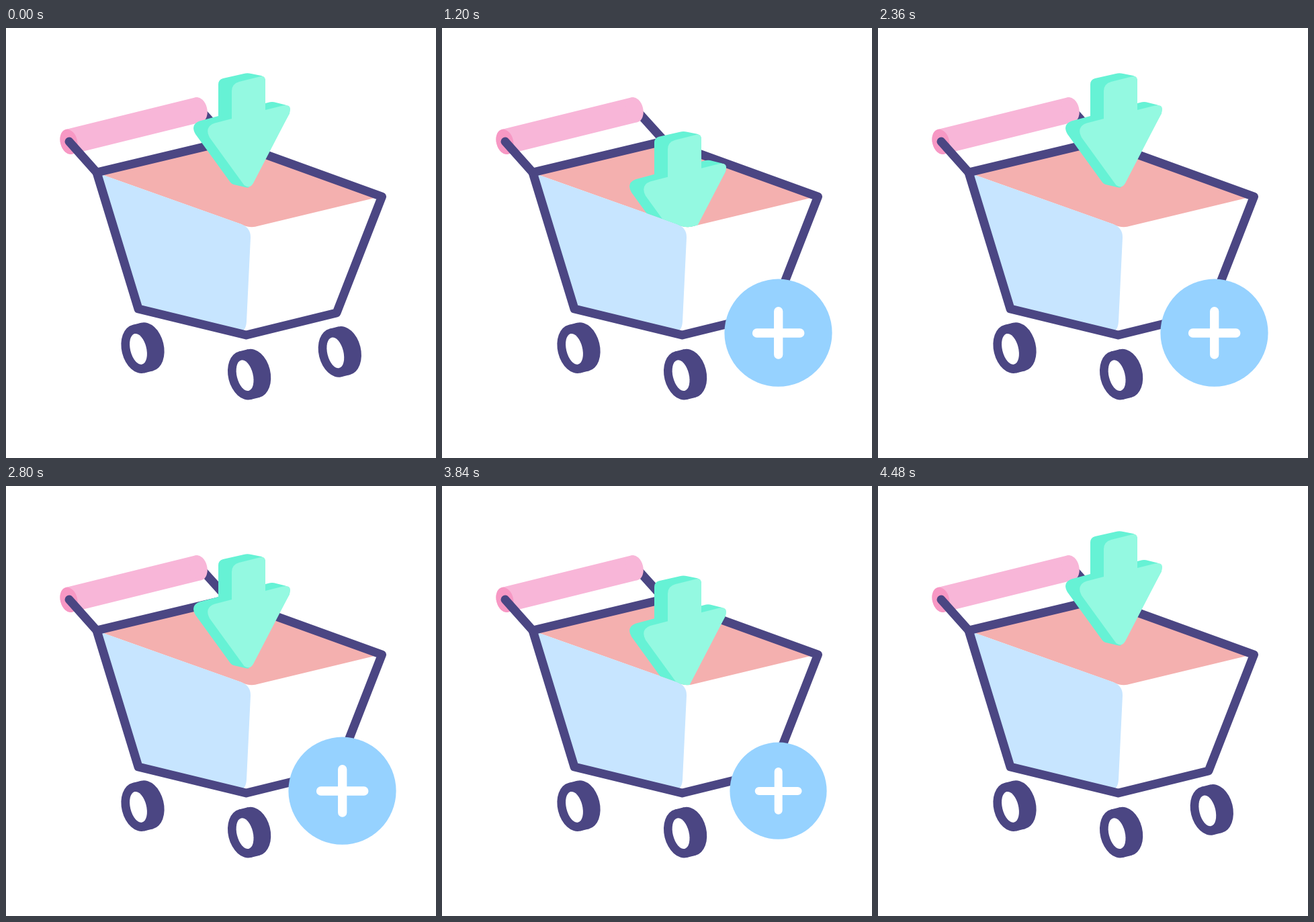
Animation, 640 px wide and 640 px high, one loop 4.68 s. Source, as an HTML page with a canvas:

```html
<!DOCTYPE html>
<html lang="en">
<head>
<meta charset="utf-8">
<title>Add to cart</title>
<style>
html, body { margin: 0; width: 100%; height: 100%; overflow: hidden; background: #fff; }
canvas { display: block; width: 100vmin; height: 100vmin; margin: 0 auto; }
</style>
</head>
<body>
<canvas id="stage" width="640" height="640"></canvas>
<script>
const ctx = document.getElementById('stage').getContext('2d');
const LOOP = 4680, STEP = 40;
const TILT = -0.242;
const INK = '#4b4683';

const shapes = {
  opening: new Path2D('M135 215.5L331 168L559 250.5L376 294.6Q363 299 350 292Z'),
  side: new Path2D('M135 215.5L349 291.5Q364.5 297 364 312L358 437Q357 453 346 451L197 418Z'),
  frame: new Path2D('M135 215L331 168.3L559.5 251L492 424L357.5 457L197 418Z'),
  backStrut: new Path2D('M290 123L331 168.3'),
  frontStrut: new Path2D('M94 169L135 215'),
  // everything above the front rim
  aboveRim: new Path2D('M0 0H640V231L376 294.6Q363 299 350 292L0 167.5Z'),
  arrowBody: new Path2D('M316 131V84Q316 77 323 75L354 68Q359 66.5 365 68L380 71Q386 73 386 79' +
    'V112L393 110.3Q396 109.7 399 110.3L416 114.5Q424 117 422 127L361 237.5Q358 237.5 352 236' +
    'L339 233Q335 232 332 227L282 158Q274 144 288 138.5Z'),
  arrowFace: new Path2D('M336 135V94Q336 83 347 80L379 72Q386 70.5 386 79V122L413 115.3' +
    'Q427 113 421.5 128L368 231Q363 240 354.5 234L303 163Q295 147.5 310 141.8Z')
};

function fill(path, color) {
  ctx.fillStyle = color;
  ctx.fill(path);
}

function stroke(path, color, width) {
  ctx.strokeStyle = color;
  ctx.lineWidth = width;
  ctx.stroke(path);
}

function oval(x, rx, ry, color) {
  ctx.fillStyle = color;
  ctx.beginPath();
  ctx.ellipse(x, 0, rx, ry, 0, 0, Math.PI * 2);
  ctx.fill();
}

// Tilted cylinder whose near end is centred on x, y
function cylinder(x, y, length, rx, ry, color, endRx, endRy, endColor) {
  ctx.save();
  ctx.translate(x, y);
  ctx.rotate(TILT);
  oval(0, rx, ry, color);
  ctx.fillRect(0, -ry, length, ry * 2);
  oval(length, rx, ry, color);
  oval(0, endRx, endRy, endColor);
  ctx.restore();
}

function wheel(x, y) {
  cylinder(x, y, 13.4, 24.8, 36.8, INK, 12, 23.4, '#fff');
}

// Bezier easing with handles (.6, 0) and (.4, 1)
function ease(v) {
  if (v <= 0) return 0;
  if (v >= 1) return 1;
  let lo = 0, hi = 1, s = 0.5;
  for (let k = 0; k < 24; k++) {
    s = (lo + hi) / 2;
    const x = 1.8 * s * (1 - s) ** 2 + 1.2 * s * s * (1 - s) + s ** 3;
    if (x < v) lo = s; else hi = s;
  }
  return s * s * (3 - 2 * s);
}

const ramp = (n, from, to) => ease((n - from) / (to - from));

function arrowDrop(n) {
  const k = n % 58;
  return 87 * ramp(k < 29 ? k : 54 - k, 0.9, 25.3);
}

function badgeScale(n) {
  return n < 58 ? ramp(n, 7.2, 23.7) : 1 - ramp(n, 92, 106.7);
}

function drawArrow(dy) {
  ctx.save();
  ctx.clip(shapes.aboveRim);
  ctx.translate(0, dy);
  fill(shapes.arrowBody, '#66f2d5');
  fill(shapes.arrowFace, '#94f9e1');
  ctx.restore();
}

function drawBadge(scale) {
  if (scale < 0.002) return;
  ctx.save();
  ctx.translate(500.5, 453.7);
  ctx.scale(scale, scale);
  oval(0, 80.1, 80.1, '#96d2ff');
  stroke(new Path2D('M-32 0.3H32.3M0.2 -32V32.3'), '#fff', 13.3);
  ctx.restore();
}

function draw(n) {
  ctx.fillStyle = '#fff';
  ctx.fillRect(0, 0, 640, 640);
  ctx.lineCap = ctx.lineJoin = 'round';

  fill(shapes.opening, '#f4b0af');
  fill(shapes.side, '#c7e5ff');
  stroke(shapes.backStrut, INK, 13);
  stroke(shapes.frame, INK, 13);
  cylinder(93.5, 169.3, 199, 12.6, 18.9, '#f8b6d8', 12.6, 18.9, '#f798c4');
  stroke(shapes.frontStrut, INK, 13);
  wheel(197, 477.8);
  wheel(355.6, 517.2);
  wheel(490.3, 483.4);

  drawArrow(arrowDrop(n));
  drawBadge(badgeScale(n));
}

const start = performance.now();
function tick() {
  const t = (performance.now() - start) % LOOP;
  draw(Math.floor(t / STEP));
  requestAnimationFrame(tick);
}
tick();
</script>
</body>
</html>
```
